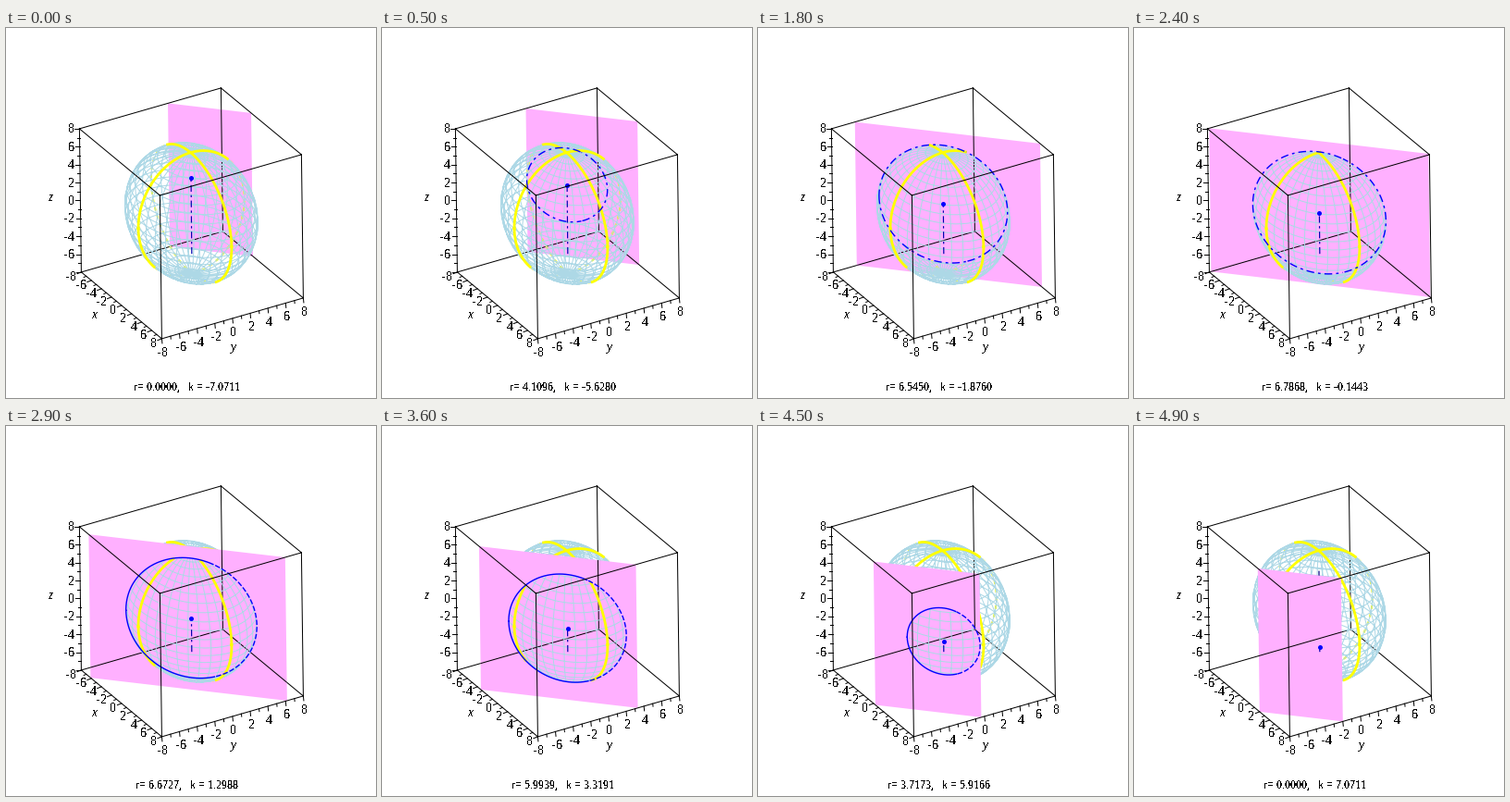
Animation of 400x400 px, one loop 5000 ms. Source, as a matplotlib script:

```python
import itertools

import matplotlib.pyplot as plt
import numpy as np
from matplotlib.animation import FuncAnimation

FRAMES, INTERVAL = 50, 100
PX = 0.72  # points per pixel at 100 dpi
BLUE, YELLOW, MESH, PINK = "#0000ff", "#ffff00", "#add8e6", "#ffb0ff"

# Orthographic view: one unit along x, y, z in screen pixels
VIEW = np.array([[87, 72], [153, -44], [-2, -155]]) / 16
TO_EYE = np.cross(VIEW[:, 0], -VIEW[:, 1])
SEMI = np.array([8, 6, np.sqrt(46.08)])
K_MAX = np.sqrt(50)

plt.rcParams.update({"font.family": "Liberation Serif", "text.antialiased": False,
                     "text.hinting": "native", "text.hinting_factor": 1})
fig = plt.figure(figsize=(4, 4), dpi=100, facecolor="white")
ax = fig.add_axes([0, 0, 1, 1])
ax.set_xlim(0, 400)
ax.set_ylim(400, 0)
ax.axis("off")


def project(points):
    return np.asarray(points, float) @ VIEW + 200.4


def section(normal, offset, n=120):
    """Curve where the plane normal . p = offset cuts the ellipsoid."""
    m = SEMI * np.array(normal, float)
    size = np.linalg.norm(m)
    m /= size
    h = np.clip(offset / size, -1, 1)
    e1 = np.cross(m, [0, 0, 1] if abs(m[2]) < 0.9 else [0, 1, 0])
    e1 /= np.linalg.norm(e1)
    e2 = np.cross(m, e1)
    t = np.linspace(0, 2 * np.pi, n)[:, None]
    return SEMI * (h * m + np.sqrt(1 - h * h) * (np.cos(t) * e1 + np.sin(t) * e2))


def join(curves):
    gap = np.full((1, 3), np.nan)
    return np.vstack([part for c in curves for part in (c, gap)])


def stroke(color, width, z, points=None, **style):
    line, = ax.plot([], [], color=color, lw=width * PX, zorder=z, **style)
    if points is not None:
        line.set_data(*project(points).T)
    return line


def show(line, points, mask=None):
    points = np.array(points, float)
    if mask is not None:
        points[~mask] = np.nan
    line.set_data(*project(points).T)


def label(x, y, text, size=14, **style):
    return ax.text(x, y, text, fontsize=size * PX, zorder=20, **style)


# Wireframe of parallels and meridians
PARALLELS, MERIDIANS = 24, 36
mesh_curves = [section((0, 0, 1), SEMI[2] * np.cos(v))
               for v in np.linspace(0, np.pi, PARALLELS + 1)[1:-1]]
mesh_curves += [section((np.sin(u) / SEMI[0], -np.cos(u) / SEMI[1], 0), 0)
                for u in np.arange(MERIDIANS // 2) * 2 * np.pi / MERIDIANS]
mesh = join(mesh_curves)
rings = join([section((1, 0, 0), 0, 300), section((0, 1, 0), 0, 300)])
near_side = (rings / SEMI ** 2) @ TO_EYE > 0

# Box edges
front_edges, back_edges = [], []
for a, b in itertools.combinations(itertools.product((-8, 8), repeat=3), 2):
    if sum(p != q for p, q in zip(a, b)) == 1:
        hidden = (-8, 8, -8) in (a, b)
        (back_edges if hidden else front_edges).append(np.array([a, b], float))
stroke("black", 1, 12, join(front_edges))
stroke("black", 1, 0, join(back_edges))
back_on_plane = stroke("black", 1, 5, join(back_edges))

# Ticks and labels
for v in range(-8, 9):
    major = v % 2 == 0
    length = 5 if major else 3
    for point, way in (((-8, -8, v), (-1, 0)),
                       ((v, -8, -8), (-0.9, 0.35)),
                       ((8, v, -8), (0.1, 1))):
        x, y = project(point)
        ax.plot([x, x + way[0] * length], [y, y + way[1] * length], color="black",
                lw=PX, zorder=12)
    if major:
        if v > -8:
            x, y = project((-8, -8, v))
            label(74, y - 0.5, str(v), ha="right", va="center_baseline")
        x, y = project((v, -8, -8))
        label(x - 5, y + 4, str(v), ha="right", va="center_baseline")
        x, y = project((8, v, -8))
        label(x + 1.5, y + 14, str(v), ha="center", va="center_baseline")
for x, y, name in ((49, 187, "z"), (96, 314, "x"), (246, 349, "y")):
    label(x, y, name, ha="center", va="baseline", style="italic")
caption = label(195.5, 392, "", size=13, ha="center", va="baseline")

# Moving parts, one set on each side of the cutting plane
DASH_DOT = (0, (6, 3, 2, 3))
plane = ax.fill([0, 0, 0, 0], [0, 0, 0, 0], color=PINK, lw=0, zorder=4)[0]
layers = []
for base in (1, 6):
    layers.append((stroke(YELLOW, 2, base, linestyle=(0, (2, 2.5))),
                   stroke(MESH, 1, base + 0.5),
                   stroke(YELLOW, 2.8, base + 1)))
axis_behind = stroke("#000080", 1.2, 3, linestyle=DASH_DOT)
axis_front = stroke("#0000b0", 1.2, 9, linestyle=DASH_DOT)
circle_left = stroke(BLUE, 1.4, 10)
circle_right = stroke(BLUE, 1.4, 10)
dot, = ax.plot([], [], "o", color=BLUE, ms=5 * PX, mew=0, zorder=11)


def center(k):
    return np.sqrt(2) * k * np.array([0.64, -0.36, 0])


def update(i):
    k = K_MAX * (2 * i / (FRAMES - 1) - 1)
    d = np.sqrt(2) * k
    r = 0.96 * np.sqrt(max(0, 50 - k * k))

    lo, hi = max(-8, d - 8), min(8, d + 8)
    plane.set_xy(project([(lo, lo - d, 8), (hi, hi - d, 8),
                          (hi, hi - d, -8), (lo, lo - d, -8)]))
    back_on_plane.set_clip_path(plane)

    for (far, wire, near), sign in zip(layers, (-1, 1)):
        ring_side = sign * (rings[:, 0] - rings[:, 1] - d) > 0
        show(far, rings, ring_side & ~near_side)
        show(near, rings, ring_side & near_side)
        show(wire, mesh, sign * (mesh[:, 0] - mesh[:, 1] - d) > 0)

    show(axis_behind, [center(-8), center(k)])
    show(axis_front, [center(8), center(k)])
    dot.set_data(*project([center(k)]).T)

    if r > 0.01:
        ring = section((1, -1, 0), d, 240)
        right = ring[:, 0] + ring[:, 1] > center(k).sum() + 0.5 * r
        show(circle_left, ring, ~right)
        show(circle_right, ring, right)
    else:
        circle_left.set_data([], [])
        circle_right.set_data([], [])
    circle_left.set_linestyle(DASH_DOT if k < 0 else "-")
    circle_right.set_linestyle(DASH_DOT if k < 0 else (0, (4, 1.5)))

    caption.set_text(f"r= {r:.4f},   k = {k:.4f}")
    return []


anim = FuncAnimation(fig, update, frames=FRAMES, interval=INTERVAL,
                     init_func=lambda: [], repeat=True, repeat_delay=0)
plt.show()
```
